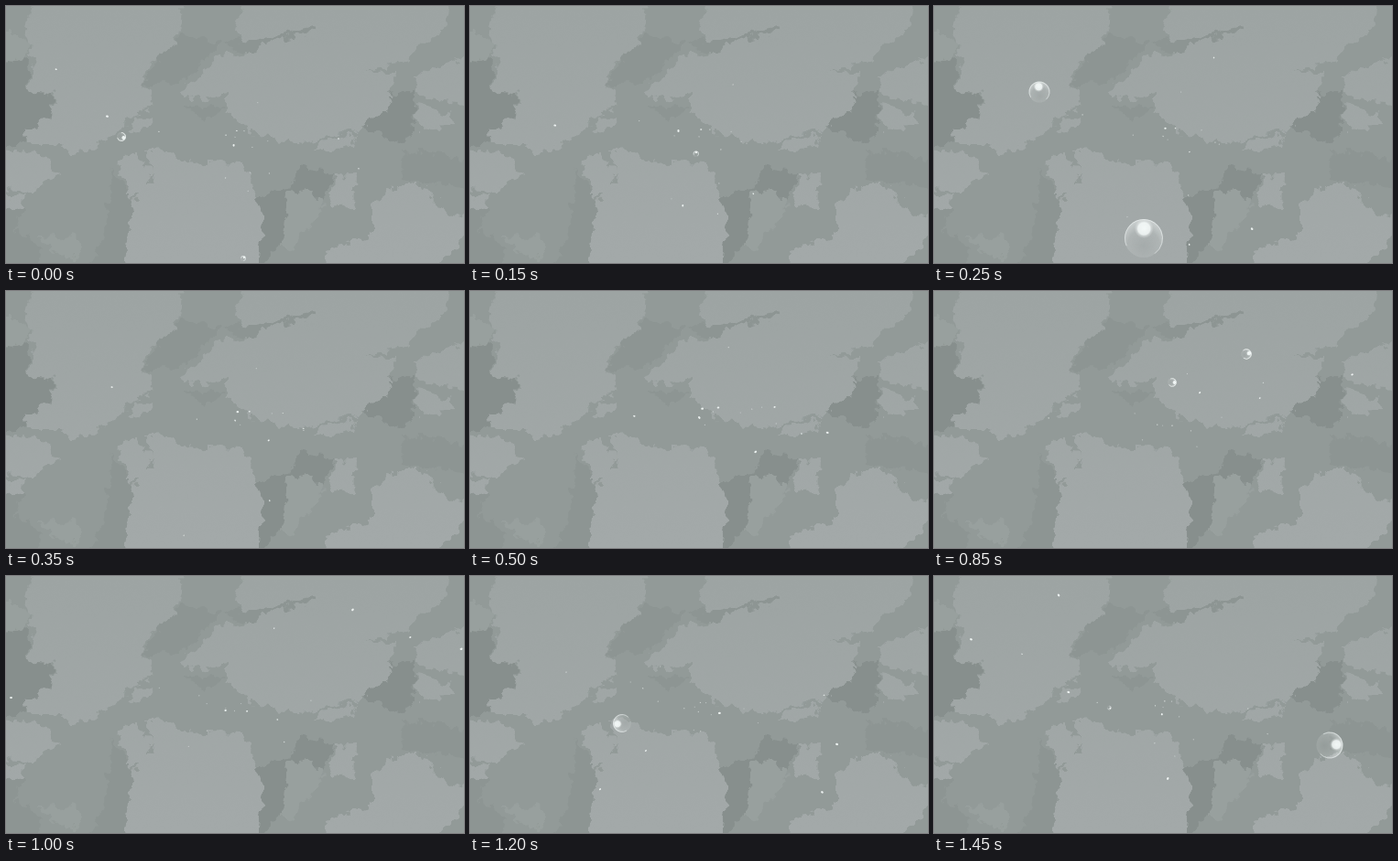
Recreate the animation shown at these times as an HTML page with a canvas. Size 500 by 281 pixels, loop 1500 ms.

```html
<!DOCTYPE html>
<html lang="en">
<head>
<meta charset="utf-8">
<title>Bubbles in a grey sky</title>
<style>
  html, body { margin: 0; width: 100%; height: 100%; overflow: hidden; background: #929a98; }
  svg, canvas { position: absolute; left: 0; top: 0; width: 100%; height: 100%; display: block; }
  .dark { fill: #878f8d; }
  .dim { fill: #8d9593; }
  .mid { fill: #98a09e; }
  .light { fill: url(#haze); }
</style>
</head>
<body>
<svg viewBox="0 0 500 281" preserveAspectRatio="none">
  <linearGradient id="haze" gradientUnits="userSpaceOnUse" x1="0" y1="0" x2="0" y2="281">
    <stop offset="0" stop-color="#9da4a3"/>
    <stop offset="1" stop-color="#a3a9a9"/>
  </linearGradient>
  <!-- roughens the plain outlines below into cloud edges -->
  <filter id="ragged" filterUnits="userSpaceOnUse" x="-20" y="-20" width="540" height="321" color-interpolation-filters="sRGB">
    <feTurbulence type="fractalNoise" baseFrequency=".085" numOctaves="3" seed="4"/>
    <feDisplacementMap in="SourceGraphic" scale="17" xChannelSelector="R" yChannelSelector="G"/>
  </filter>
  <g filter="url(#ragged)">
    <g class="dim">
      <path d="M192 30 235 40 195 82 150 88 160 64Z"/>
      <path d="M196 112 238 108 220 128Z"/>
      <path d="M236 42 346 12 345 32 270 55Z"/>
      <path d="M434 158 515 168 515 200 432 190Z"/>
      <path d="M116 180 142 215 130 295 85 295 108 250Z"/>
      <path d="M-15 228 20 218 10 245 40 265 30 295-15 295Z"/>
    </g>
    <g class="dark">
      <path d="M-15 65 25 55 24 92 52 98 50 122 20 150-15 158Z"/>
      <path d="M420 95 445 92 446 140 430 150 390 132Z"/>
      <path d="M272 210 310 200 320 175 357 182 350 205 274 290Z"/>
    </g>
    <g class="mid">
      <path d="M-15 32 15 32 28 45 18 57-15 66Z"/>
      <path d="M36 252 70 250 85 265 65 280Z"/>
      <path d="M308 205 335 200 345 220 315 265 300 262Z"/>
    </g>
    <g class="light">
      <path d="M258-15 335-15 346 10 335 23 268 39 250 34Z"/>
      <path d="M28-15 193-15 192 20 182 45 158 62 148 88 160 92 158 112 130 125 128 136 72 165 58 150 22 150 20 136 48 122 55 98 24 92 32 60 20 30Z"/>
      <path d="M140 122 160 120 156 134 134 136Z"/>
      <path d="M345-15 485-15 480 22 435 60 390 72 424 73 420 108 385 135 325 150 275 143 240 115 240 98 205 103 190 92 212 78 230 55 270 52 285 40 335 29Z"/>
      <path d="M448 75 490 60 515 45 515 108 480 105 447 92Z"/>
      <path d="M446 108 485 118 486 132 450 134Z"/>
      <path d="M333 160 345 148 382 140 378 153Z"/>
      <path d="M152 158 175 157 185 170 260 172 280 235 272 295 130 295 138 215 160 190Z"/>
      <path d="M120 165 140 162 158 180 150 208 135 208Z"/>
      <path d="M-15 158 38 160 58 185 25 205-15 200Z"/>
      <path d="M-15 208 20 206 18 220-15 225Z"/>
      <path d="M345 295 352 265 400 250 400 218 430 195 455 195 475 222 515 235 465 295Z"/>
      <path d="M357 185 380 184 378 220 355 222Z"/>
    </g>
  </g>
</svg>
<canvas id="sky"></canvas>
<script>
const W = 500, H = 281, LOOP = 1500, STEP = 50;
const CX = 250, CY = 145, TURN = Math.PI * 2;
const canvas = document.getElementById('sky');
const ctx = canvas.getContext('2d');
canvas.width = W;
canvas.height = H;

// place and radius at a given time, ms left until it passes the viewer, angle of the shine
const bubbles = [
  { x: 126, y: 143, at: 0, r: 5, left: 45, shine: 0.4 },
  { x: 259, y: 276, at: 0, r: 3, left: 70, shine: -1 },
  { x: 115, y: 94, at: 250, r: 11.5, left: 20, shine: -1.7 },
  { x: 229, y: 254, at: 250, r: 21, left: 18, shine: -1.55 },
  { x: 253, y: 73, at: 650, r: 21, left: 15, shine: -2.2 },
  { x: 444, y: 242, at: 650, r: 6, left: 70, shine: 2.5 },
  { x: 341, y: 69, at: 850, r: 5.8, left: 105, shine: -0.3 },
  { x: 260, y: 100, at: 850, r: 4.8, left: 200, shine: 0 },
  { x: 166, y: 161, at: 1200, r: 10, left: 28, shine: 3 },
  { x: 432, y: 185, at: 1450, r: 14.5, left: 35, shine: -0.1 }
];

let seed = 11;
function random() {
  seed = seed * 16807 % 2147483647;
  return seed / 2147483647;
}

const SPECKS = 34;
const specks = Array.from({ length: SPECKS }, (_, i) => {
  const dir = random() * TURN, reach = 45 + 110 * random();
  return {
    x: CX + Math.cos(dir) * reach * 1.2,
    y: CY + Math.sin(dir) * reach,
    at: i * LOOP / SPECKS,
    r: 0.8 + 0.5 * random(),
    left: 230,
    shine: dir,
    speck: true
  };
});

const white = a => `rgba(250,255,254,${a})`;

function disc(x, y, r, fill) {
  ctx.fillStyle = fill;
  ctx.beginPath();
  ctx.arc(x, y, r, 0, TURN);
  ctx.fill();
}

function glow(x, y, r, stops) {
  const g = ctx.createRadialGradient(x, y, 0, x, y, r);
  stops.forEach(([at, a]) => g.addColorStop(at, white(a)));
  return g;
}

function drawSpeck(x, y, size, angle) {
  const r = Math.min(size, 1.5);
  ctx.fillStyle = white(Math.min(0.85, r * 0.8));
  ctx.beginPath();
  ctx.ellipse(x, y, Math.max(r, 0.7), Math.max(r * 0.75, 0.6), angle, 0, TURN);
  ctx.fill();
}

function drawBubble(x, y, r, angle) {
  const dx = Math.cos(angle) * r, dy = Math.sin(angle) * r;

  // body, clearer on the side away from the shine
  disc(x, y, r, glow(x - dx * 0.4, y - dy * 0.4, r * 1.4, [[0, 0.03], [0.6, 0.14], [1, 0.5]]));

  ctx.lineWidth = Math.min(1, r * 0.2);
  ctx.strokeStyle = white(r < 7 ? 0.65 : 0.45);
  ctx.beginPath();
  ctx.arc(x, y, r - 0.5, angle - 2, angle + 2.5);
  ctx.stroke();

  const sx = x + dx * 0.5, sy = y + dy * 0.5;
  disc(sx, sy, r * 0.5, glow(sx, sy, r * 0.5, [[0, 0.9], [0.62, 0.8], [0.78, 0.3], [1, 0]]));
}

// Flies outwards from the centre; size and distance grow as 1 / time left.
function drawFlyer({ x, y, at, r, left, shine, speck }, t) {
  const rest = ((left + at - t) % LOOP + LOOP) % LOOP;
  if (rest < 1) return;
  const s = left / rest, size = r * s;
  if (size < 0.4) return;
  const draw = speck || size < 2 ? drawSpeck : drawBubble;
  draw(CX + (x - CX) * s, CY + (y - CY) * s, size, shine);
}

function render(now) {
  const t = Math.floor(now % LOOP / STEP) * STEP;
  ctx.clearRect(0, 0, W, H);
  specks.forEach(p => drawFlyer(p, t));
  bubbles.forEach(p => drawFlyer(p, t));
}

const start = performance.now();
function tick() {
  render(performance.now() - start);
  requestAnimationFrame(tick);
}
tick();
</script>
</body>
</html>
```
